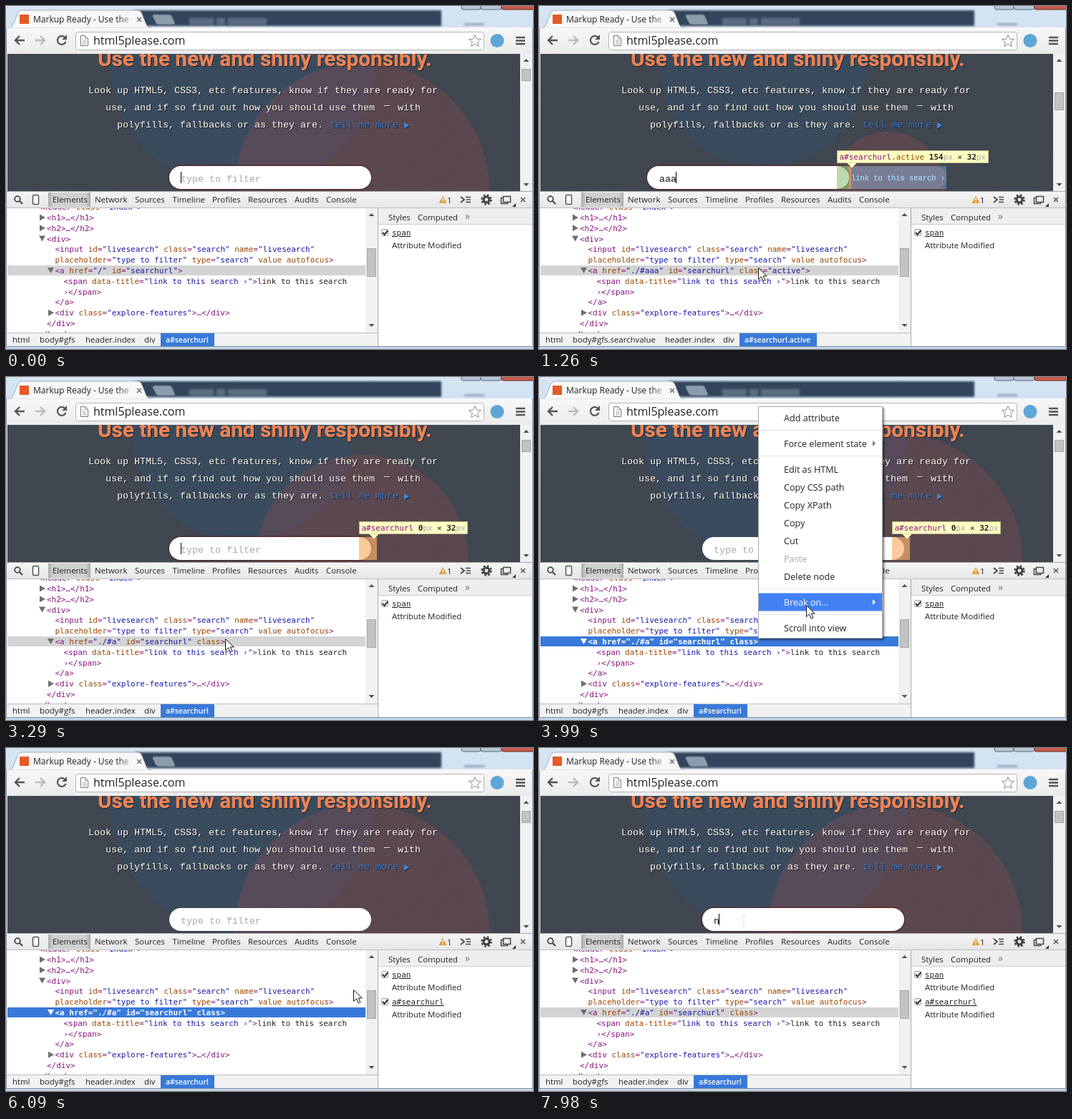
Recreate the animation shown at these times as an HTML page. Size 736 by 480 pixels, loop 8 s.

```html
<!DOCTYPE html>
<html lang="en">
<head>
<meta charset="utf-8">
<title>Breakpoint demo</title>
<style>
html, body { margin: 0; width: 100%; height: 100%; overflow: hidden; background: #cfe0f0; }
svg { display: block; width: 736px; height: 480px; }
text { white-space: pre; fill: #222; }
.ui { font: 11.4px "Open Sans", "Noto Sans", sans-serif; }
.menu { font: 12.6px "Open Sans", "Noto Sans", sans-serif; }
.tab { font: 12px "Open Sans", "Noto Sans", sans-serif; }
.url { font: 16px "Open Sans", "Noto Sans", sans-serif; }
.code { font: 10.96px "DejaVu Sans Mono", monospace; }
.body { font: 13.33px "Liberation Mono", monospace; fill: #f1ebdf; }
.link { font: 10.4px "Liberation Mono", monospace; fill: #a9d6ff; }
.head { font: bold 29.7px Roboto, sans-serif; fill: #ee8354; }
.crumb { font: 600 10.4px "Open Sans", "Noto Sans", sans-serif; }
.b { font-weight: bold; }
.w, .w tspan { fill: #fff; }
.tag { fill: #881280; }
.attr { fill: #994500; }
.val { fill: #1a1aa6; }
.gray { fill: #a9a9a9; }
</style>
</head>
<body>
<svg id="stage" viewBox="0 0 736 480"></svg>
<script>
const LOOP = 8000, TICK = 70;

// ---- markup helpers ----
const esc = s => s.replace(/&/g, '&amp;').replace(/</g, '&lt;');
const text = (x, y, s, cls, more = '') => `<text x="${x}" y="${y}" class="${cls}" ${more}>${esc(s)}</text>`;
const rect = (x, y, w, h, fill, more = '') => `<rect x="${x}" y="${y}" width="${w}" height="${h}" fill="${fill}" ${more}/>`;
const path = (d, fill, more = '') => `<path d="${d}" fill="${fill}" ${more}/>`;
const line = (d, color, w = 1, more = '') => path(d, 'none', `stroke="${color}" stroke-width="${w}" ${more}`);
const disc = (x, y, r, fill, more = '') => `<circle cx="${x}" cy="${y}" r="${r}" fill="${fill}" ${more}/>`;
const span = (cls, s) => `<tspan class="${cls}">${esc(s)}</tspan>`;
const group = (id, more = '') => `<g id="${id}" ${more}></g>`;

const rowY = i => 296 + i * 14.8;
const tokens = /"[^"]*"|(?:^|\s)[a-z-]+(?=[ =>]|$)|[^" ]+/g;
function code(x, row, src, plain = '', cls = '') {
  const parts = src.match(tokens).map(s =>
    span(s[0] === '"' ? 'val' : /^\s?[a-z]/.test(s) ? 'attr' : 'tag', s));
  return `<text x="${x}" y="${rowY(row) + 4}" class="code ${cls}">${parts.join('')}${span('', plain)}</text>`;
}
const right = (x, y, c = '#6e6e6e') => path(`M${x} ${y - 4.5}l8 4.5l-8 4.5z`, c);
const down = (x, y, c = '#6e6e6e') => path(`M${x} ${y - 4}h9l-4.5 8z`, c);
const tri = (x, y, dir) => path(`M${x - 4} ${y + dir * 2}h8l-4 ${-dir * 4}z`, '#505050');

// ---- time helpers ----
const at = (t, table) => table.reduce((v, [time, val]) => t >= time ? val : v, table[0][1]);
function tween(t, keys) {
  let i = keys.findIndex(k => k[0] > t);
  if (i < 0) return keys[keys.length - 1].slice(1);
  if (i === 0) return keys[0].slice(1);
  const [a, b] = [keys[i - 1], keys[i]], p = (t - a[0]) / (b[0] - a[0]);
  return a.slice(1).map((v, n) => v + (b[n + 1] - v) * p);
}

// ---- timeline ----
const typed = [[0, ''], [140, 'a'], [350, 'aa'], [490, 'aaa'], [2240, 'aa'], [2520, 'a'], [2940, ''], [7980, 'n']];
const caretOn = [[0, 1], [1750, 0], [2240, 1], [3360, 0], [7420, 1], [7840, 0], [7980, 1]];
const href = [[0, '/'], [280, './#a'], [490, './#aa'], [700, './#aaa'], [2450, './#aa'], [2660, './#a']];
const klass = [[0, ''], [280, ' class="active"'], [2800, ' class']];
const hover = [[0, ''], [1050, 'link'], [3220, 'empty'], [4970, ''], [6860, 'div'], [6930, '']];
const slide = [[140, 0], [280, -40], [420, -66], [560, -77], [2940, -77], [3080, -35], [3220, 0]];
const blue = [[210, 330, 75, 185], [840, 312, 82, 144], [2799, 312, 82, 144], [2800, 330, 75, 0], [2940, 330, 75, 0], [3360, 330, 75, 185]];
const red = [[210, 497, 257, 178], [840, 487, 256, 80], [2799, 487, 256, 80], [2800, 497, 257, 0], [2940, 497, 257, 0], [3360, 497, 257, 178]];
const arrow = [[910, 340, 386], [1050, 322, 372], [1120, 306, 366], [3570, 306, 366], [3990, 373, 319], [4200, 373, 319], [4690, 485, 338]];
const beam = [[6860, 268, 219], [6930, 252, 212], [7070, 252, 212], [7140, 272, 222], [7210, 283, 232], [7350, 283, 232], [7420, 286, 242]];

// ---- fixed parts ----
const defs = `<defs>
<linearGradient id="glass" x2="0" y2="1"><stop stop-color="#d5e4f3"/><stop offset="1" stop-color="#bdd3ea"/></linearGradient>
<linearGradient id="bar" x2="0" y2="1"><stop stop-color="#f8f8f8"/><stop offset="1" stop-color="#ebebeb"/></linearGradient>
<linearGradient id="tools" x2="0" y2="1"><stop stop-color="#f5f5f5"/><stop offset="1" stop-color="#e6e6e6"/></linearGradient>
<linearGradient id="fade"><stop stop-color="#f8f8f8" stop-opacity="0"/><stop offset="1" stop-color="#f8f8f8"/></linearGradient>
<linearGradient id="picked"><stop stop-color="#aaa"/><stop offset=".12" stop-color="#d0d0d0"/><stop offset=".88" stop-color="#d0d0d0"/><stop offset="1" stop-color="#aaa"/></linearGradient>
<pattern id="denim" width="4" height="4" patternUnits="userSpaceOnUse">
<path d="M0 0h1v2h-1zM2 2h1v2h-1z" fill="#fff" opacity=".06"/><path d="M1 1h1v2h-1zM3 3h1v1h-1zM3 0h1v1h-1z" fill="#000" opacity=".12"/></pattern>
<filter id="blur"><feGaussianBlur stdDeviation="1.4"/></filter>
<filter id="shade" x="-10%" y="-10%" width="120%" height="125%"><feDropShadow dx="2" dy="2" stdDeviation="1.5" flood-opacity=".5"/></filter>
<filter id="ink"><feDropShadow dx="1" dy="1" stdDeviation=".3" flood-color="#111820" flood-opacity=".8"/></filter>
<clipPath id="page"><rect x="2" y="67" width="716" height="192"/></clipPath>
<clipPath id="tree"><rect x="2" y="283" width="500" height="174"/></clipPath>
</defs>`;

const frame = rect(0, 0, 736, 480, 'url(#glass)') + group('back') +
  rect(636, -6, 27, 11, '#b6c6d6', 'rx="3" stroke="#566879"') + rect(663, -6, 29, 11, '#b6c6d6', 'rx="3" stroke="#566879"') +
  rect(692, -6, 48, 11, '#c65b4c', 'rx="3" stroke="#5c2a28"') +
  path('M207 12h21q3 0 4 3l4 9q0 2-3 2h-19q-4 0-5-3l-4-8q-1-3 2-3z', '#8d9cab', 'stroke="#5c6b7a"') +
  rect(1, 30, 734, 37, 'url(#bar)') +
  path('M2 31q6 0 8-5l6-15q2-5 7-5h160q5 0 7 5l6 15q2 5 8 5z', '#f8f8f8', 'stroke="#8796a6" stroke-width=".7"') +
  rect(2, 30.6, 203, 2, '#f8f8f8') +
  rect(19, 12, 13, 13, '#e55a26') +
  text(38, 23, 'Markup Ready - Use the', 'tab') + rect(156, 8, 25, 20, 'url(#fade)') +
  line('M183 16l6 6M189 16l-6 6', '#666', 1.4) +
  line('M26 48h-12M19 42l-6 6l6 6', '#555', 2.4) + line('M41 48h12M48 42l6 6l-6 6', '#bbb', 2.4) +
  line('M82.5 44a6 6 0 1 0 1 6', '#555', 2.2) + path('M85 40v7h-7z', '#555') +
  rect(97.5, 36.5, 570, 25, '#fff', 'rx="3" stroke="#b4b4b4"') +
  path('M104.5 41.5h6l4 4v10h-10z', '#fff', 'stroke="#777"') + line('M110.5 41.5v4h4M107 48h5M107 50.5h5M107 53h5', '#888', .8) +
  text(122, 54, 'html5please.com', 'url') +
  path('M655 40.5l2.4 5.6l6 .5l-4.6 4l1.4 6l-5.2-3.2l-5.2 3.2l1.4-6l-4.6-4l6-.5z', '#fff', 'stroke="#8a8a8a"') +
  disc(686, 48.5, 9.5, '#5ea5d8') + line('M712 44h13M712 48.5h13M712 53h13', '#555', 2.4);

const icons = disc(16, 270, 3.8, 'none', 'stroke="#444" stroke-width="1.8"') + line('M19 273l4 4', '#444', 2.2) +
  rect(37.5, 264.5, 8, 13, '#fff', 'rx="1.5" stroke="#555" stroke-width="1.5"') +
  path('M610 266l5.5 10h-11z', '#e59a33') + rect(609.3, 269, 1.4, 3.5, '#fff') + rect(609.3, 273.5, 1.4, 1.4, '#fff') +
  text(616, 276, '1', 'ui') + line('M635 267l5 4l-5 4', '#444', 1.8) + line('M642 267.5h7M643 271h6M642 274.5h7', '#444', 1.6) +
  disc(671, 271, 6.3, 'none', 'stroke="#444" stroke-width="3" stroke-dasharray="2.5 2.45"') +
  disc(671, 271, 4, 'none', 'stroke="#444" stroke-width="3.2"') +
  line('M694.5 266.5h10v8h-10z', '#444', 1.5) + line('M694 268.5h-2.5v8h9v-2', '#444', 1.5) + path('M712 276v5h-5z', '#333') +
  line('M719 268l6 6M725 268l-6 6', '#555', 1.5);

const tabs = [[65, 'Elements'], [124, 'Network'], [180, 'Sources'], [232.5, 'Timeline'], [288, 'Profiles'], [338, 'Resources'], [403, 'Audits'], [447, 'Console']];
const tools = rect(1, 259, 734, 218, '#fff') + rect(1, 259, 734, 24, 'url(#tools)') +
  rect(1, 259, 734, 1, '#a8a8a8') + rect(1, 282, 734, 1, '#bdbdbd') + rect(59, 261, 59, 20, 'url(#picked)') +
  tabs.map(([x, s]) => text(x, 275, s, 'ui')).join('') + icons;

const sidebar = rect(502, 283, 17, 175, '#f1f1f1') + rect(504.5, 339.5, 12, 39, '#c3c3c3', 'stroke="#a8a8a8"') +
  tri(510.5, 292, 1) + tri(510.5, 447, -1) +
  rect(519, 283, 1, 193, '#a9a9a9') + rect(520, 283, 215, 23, '#eee') + rect(520, 305, 215, 1, '#ccc') +
  text(534, 300, 'Styles', 'ui') + text(575, 300, 'Computed', 'ui') + text(641, 299, '»', 'ui', 'style="font-size:14px;fill:#777"');
const breakpoint = (y, name) => rect(524.5, y - 4.5, 9, 9, '#f4f4f4', 'rx="2" stroke="#999"') + line(`M526 ${y}l2.5 3l5-6`, '#333', 2) +
  text(539, y + 4, name, 'code', 'text-decoration="underline"') + text(539, y + 22, 'Attribute Modified', 'ui');

const copy = `<g filter="url(#ink)">${text(128, 84, 'Use the new and shiny responsibly.', 'head')}` +
  text(115, 122, 'Look up HTML5, CSS3, etc features, know if they are ready for', 'body') +
  text(139, 146, 'use, and if so find out how you should use them', 'body') + rect(528, 139, 8, 1, '#f1ebdf') + text(547, 146, 'with', 'body') +
  text(155, 170, 'polyfills, fallbacks or as they are.', 'body') +
  text(452, 170, 'tell me more', 'body', 'style="fill:#3873bd"') + path('M556 163l7 4.2l-7 4.2z', '#3f86d8') + '</g>';

const rows = code(45, -1, '<header class="index">') + right(47, rowY(0)) + code(57, 0, '<h1>…</h1>') +
  right(47, rowY(1)) + code(57, 1, '<h2>…</h2>') + down(46, rowY(2)) + code(57, 2, '<div>') +
  code(68.5, 3, '<input id="livesearch" class="search" name="livesearch"') +
  code(68.5, 4, 'placeholder="type to filter" type="search" value autofocus>') +
  code(80.5, 6, '<span data-title="link to this search ›">', 'link to this search') + code(80.5, 7, '›</span>') +
  code(68.5, 8, '</a>') + right(59, rowY(9)) + code(68.5, 9, '<div class="explore-features">…</div>') + code(57, 10, '</div>') + code(45, 11, '</header>');

const pageBars = rect(718, 67, 17, 192, '#f1f1f1') + tri(726.5, 76, 1) + tri(726.5, 250, -1);

document.getElementById('stage').innerHTML = defs + frame +
  `<g clip-path="url(#page)">${group('scene')}${copy}${group('search')}</g>` + pageBars + group('thumb') + tools +
  `<g clip-path="url(#tree)">${group('marks')}${rows}${group('node')}</g>` + sidebar + group('points') +
  rect(1, 457, 518, 19, '#f2f2f2') + rect(1, 457, 518, 1, '#bbb') + group('crumbs') + rect(0, 476, 736, 4, '#c3d6e9') + rect(0, 476, 736, 1, '#7d8d9d') +
  rect(0, 30, 1, 447, '#8496a8') + rect(735, 30, 1, 447, '#8496a8') + group('top');

// ---- moving parts ----
function backdrop(t) {
  const words = [[256, 34], [294, 12], [310, 54]].map(([x, w]) => rect(x, 17, w, 9, '#8496a8', 'opacity=".5"')).join('');
  return '<g filter="url(#blur)">' + rect(180, 6, 428, 22, '#33455b') + (t < 4830 ? words : '') +
    rect(640, 24, 28, 3, '#8fa3b8') + '</g>';
}

function tip(x, y, w, name, cls, wide, tall, nose) {
  return rect(x + .5, y + .5, w - 1, 17, '#ffffc2', 'stroke="#b9b98a"') + path(`M${nose - 7} ${y + 17.5}h14l-7 7z`, '#ffffc2') +
    `<text x="${x + 3.5}" y="${y + 13}" class="code">${span('tag', name)}${span('attr', cls)} ${span('b', wide)}${span('gray', 'px')} × ${span('b', tall)}${span('gray', 'px')}</text>`;
}

function highlight(kind) {
  const green = 'rgba(147,196,125,.62)', sky = 'rgba(111,168,220,.64)', orange = 'rgba(246,178,107,.68)';
  if (kind === 'link') return rect(416, 224, 17, 32, green) + rect(433, 224, 3, 32, orange) + rect(436, 224, 133, 32, 'rgba(111,168,220,.5)') +
    text(436, 244, 'link to this search ›', 'link') + tip(416, 202, 212, 'a#searchurl', '.active', '154', '32', 437);
  if (kind === 'empty') return rect(493, 224, 25, 32, orange) + tip(493, 202, 152, 'a#searchurl', '', '0', '32', 514);
  if (kind === 'div') return rect(109, 192, 502, 32, green) + rect(109, 224, 502, 40, sky) + tip(109, 170.5, 119, 'div', '', '501', '400', 131);
  return '';
}

function search(t) {
  const [dx] = tween(t, slide), s = at(t, typed), x = 228 + dx;
  const focus = t < 3360 || t >= 7420, tx = x + 16 + (dx < -70 ? 1 : 0);
  let out = '';
  if (dx < 0) out += rect(x + 100, 224, 228 - dx * 1.1 + 5, 32, '#85524a', 'rx="16"') + text(x + 285, 244, 'link to this search ›', 'link', `opacity="${-dx / 77}"`);
  if (focus) out += rect(x - 1, 223, 284, 34, 'none', 'rx="17" stroke="#5a2a2a" stroke-width="2" opacity=".6"');
  out += rect(x, 224, 282, 32, '#fff', 'rx="16"');
  out += s ? text(tx, 246, s, 'body', 'style="fill:#111"') : text(tx, 246, 'type to filter', 'body', 'style="fill:#a9a9a9"');
  if (at(t, caretOn)) out += rect(tx + s.length * 8 - (s ? 1 : 0), 232, 1, 16, '#000');
  return out + highlight(at(t, hover));
}

function scene(t) {
  const ball = (keys, fill) => { const [x, y, r] = tween(t, keys); return disc(x, y, r, fill); };
  return rect(2, 67, 716, 192, t >= 2800 && t < 3080 ? '#384a5f' : '#3f4650') +
    ball(blue, 'rgba(35,85,130,.26)') + ball(red, 'rgba(165,75,80,.27)') + rect(2, 67, 716, 192, 'url(#denim)');
}

const chosen = t => t >= 3360 && t < 7420;
function marks(t) {
  let out = rect(2, 363, 500, 14, chosen(t) ? '#3879d9' : '#d4d4d4');
  if (t >= 910 && t < 1050) out += rect(5, 377.5, 497, 14, '#e9eefb', 'rx="6"');
  if (t >= 6860 && t < 6930) out += rect(5, 319, 497, 14, '#e9eefb', 'rx="6"');
  return out;
}
const node = t => down(58, rowY(5), chosen(t) ? '#fff' : undefined) +
  code(68.5, 5, `<a href="${at(t, href)}" id="searchurl"${at(t, klass)}>`, '', chosen(t) ? 'w b' : '');

function crumbs(t) {
  const long = t >= 280 && t < 2800;
  const list = long
    ? [[9, 'html'], [47, 'body#gfs.searchvalue'], [176, 'header.index'], [257, 'div'], [287, 'a#searchurl.active']]
    : [[9, 'html'], [47, 'body#gfs'], [111, 'header.index'], [193, 'div'], [223, 'a#searchurl']];
  return rect(list[4][0] - 7, 458, long ? 108 : 75, 18, '#3879d9') +
    list.map(([x, s], i) => text(x, 471, s, i === 4 ? 'crumb w' : 'ui')).join('');
}

const entries = [[57, 'Add attribute'], [93, 'Force element state'], [129, 'Edit as HTML'], [154, 'Copy CSS path'], [179, 'Copy XPath'],
  [204, 'Copy'], [229, 'Cut'], [254, 'Paste'], [279, 'Delete node'], [315, 'Break on...'], [351, 'Scroll into view']];
const sub = [[315, 'Subtree modifications'], [340, 'Attributes modifications'], [365, 'Node removal']];
function menu(t, [cx, cy]) {
  if (t < 3360 || t >= 4830) return '';
  const item = (x, w, list, active) => list.map(([y, s]) => {
    const on = active === y;
    return (on ? rect(x + 1, y - 12.5, w - 2, 25, '#4281f4') : '') +
      text(x + 36, y + 4.5, s, on ? 'menu w' : 'menu', s === 'Paste' ? 'style="fill:#aaa"' : '') +
      (/^Force|^Break/.test(s) ? path(`M466 ${y - 4}l4 4l-4 4z`, on ? '#fff' : '#777') : '');
  }).join('');
  const panel = (x, y, w, h) => rect(x + .5, y + .5, w - 1, h - 1, '#fff', 'stroke="#aaa" filter="url(#shade)"');
  const active = cx <= 306 ? 0 : cy > 338 && cx < 480 ? 351 : cy < 327 || cx > 373 ? 315 : 0;
  let out = panel(306, 41, 174, 325) + [74, 110, 296, 332].map(y => rect(307, y, 172, 1, '#e4e4e4')).join('') + item(306, 174, entries, active);
  if (t >= 4060) out += panel(479, 299, 197, 84) + item(479, 197, sub, cx >= 479 ? 340 : 0);
  return out;
}

function pointer(t, [x, y]) {
  if (t >= 6860) {
    const [bx, by] = tween(t, beam);
    return line(`M${bx - 3} ${by - 7.5}h2.5l.5 1l.5-1h2.5M${bx} ${by - 7}v14M${bx - 3} ${by + 7.5}h2.5l.5-1l.5 1h2.5`, '#e6e6e6', 1.2);
  }
  return t < 910 ? '' : path(`M${x + .5} ${y + .5}v16l4-3.6l2.6 6l2.8-1.2l-2.6-5.8h5z`, '#fff', 'stroke="#111"');
}

const layers = {
  back: backdrop, scene, search, marks, node, crumbs,
  thumb: t => t >= 630 && t < 2800 ? rect(720.5, 121.5, 12, 24, '#c3c3c3', 'stroke="#a8a8a8"') : rect(720.5, 88.5, 12, 16, '#c3c3c3', 'stroke="#a8a8a8"'),
  points: t => breakpoint(317, 'span') + (t >= 4970 ? breakpoint(355, 'a#searchurl') : ''),
  top: t => { const p = tween(t, arrow); return menu(t, p) + pointer(t, p); }
};
const shown = {};
function draw(now) {
  const t = Math.floor((now % LOOP) / TICK) * TICK;
  for (const id in layers) {
    const html = layers[id](t);
    if (shown[id] !== html) document.getElementById(id).innerHTML = shown[id] = html;
  }
}
const start = performance.now();
(function tick() {
  draw(performance.now() - start);
  requestAnimationFrame(tick);
})();
</script>
</body>
</html>
```
